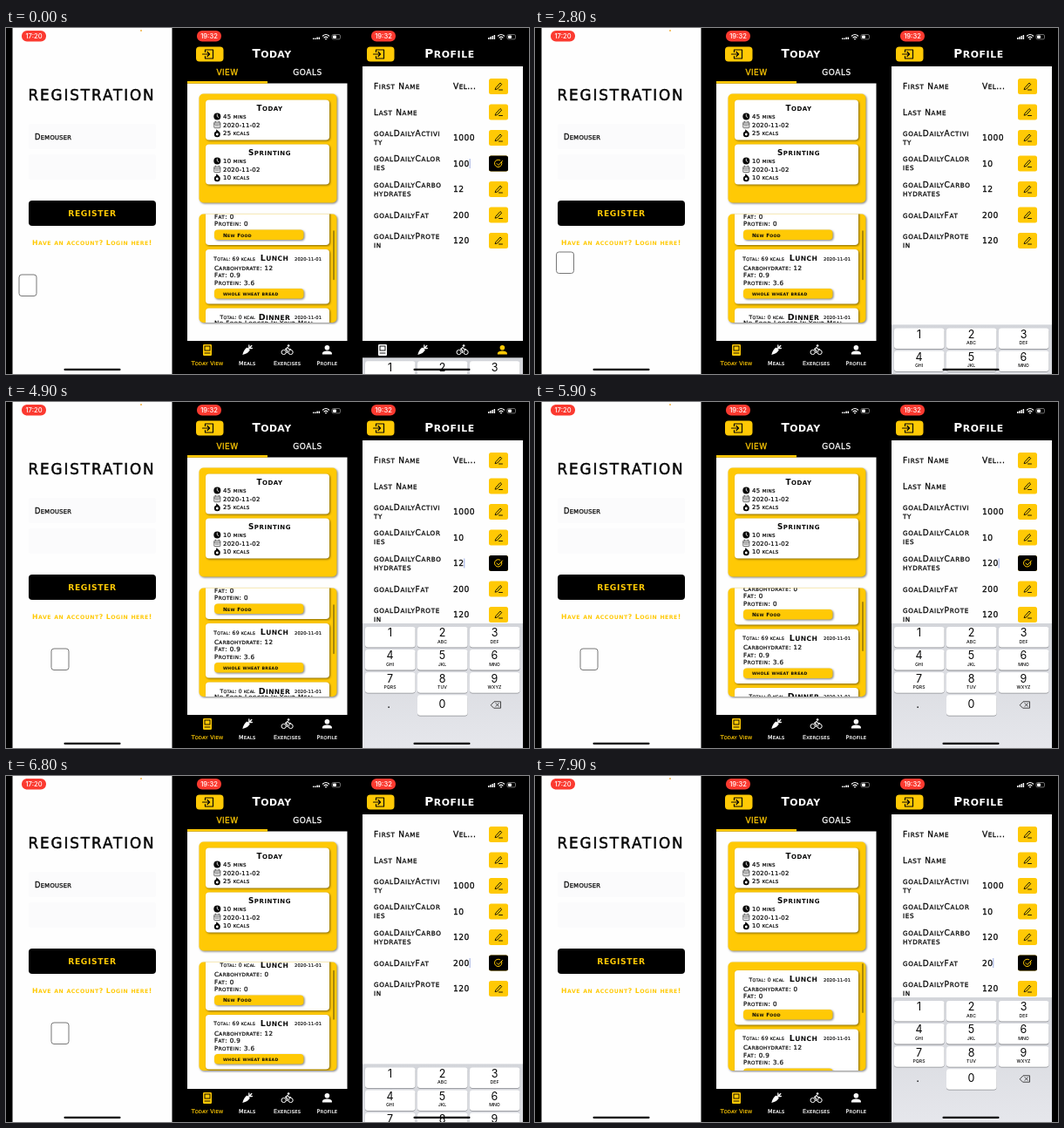
These frames come from a looping animation (600x397 px, 8000 ms). An HTML page:

```html
<!DOCTYPE html>
<html lang="en">
<head>
<meta charset="utf-8">
<title>Fitness app screens</title>
<style>
html, body { margin: 0; width: 100%; height: 100%; overflow: hidden; background: #000; }
svg { display: block; width: 100%; height: 100%; }
.caps { font-family: "DejaVu Sans", sans-serif; }
.ui { font-family: Inter, sans-serif; text-anchor: middle; }
.lift { filter: drop-shadow(1.2px 1.8px 1px rgba(0, 0, 0, .5)); }
.line { fill: none; stroke-linecap: round; stroke-linejoin: round; }
</style>
</head>
<body>
<svg id="stage" viewBox="0 0 600 397" preserveAspectRatio="none"></svg>
<script>
const LOOP = 8000, YELLOW = '#ffc905', INK = '#080808', PAGE = '#fefefe';
const stage = document.getElementById('stage');

const box = (x, y, w, h, fill, r = 0, extra = '') =>
  `<rect x="${x}" y="${y}" width="${w}" height="${h}" rx="${r}" fill="${fill}" ${extra}/>`;

const line = (d, color = INK, width = 1) =>
  `<path class="line" d="${d}" stroke="${color}" stroke-width="${width}"/>`;

const at = (x, y, content) => `<g transform="translate(${x} ${y})">${content}</g>`;

// Lower-case letters become smaller capitals; a thin stroke gives a medium weight.
function caps(x, y, text, size, { bold = false, fill = INK, space = .3, anchor = 'start', id = '' } = {}) {
  const runs = text.replace(/[a-z]+|[^a-z]+/g, run => /[a-z]/.test(run)
    ? `<tspan font-size="${(size * .8).toFixed(2)}">${run.toUpperCase()}</tspan>`
    : `<tspan>${run}</tspan>`);
  return `<text class="caps" ${id && `id="${id}"`} x="${x}" y="${y}" font-size="${size}" fill="${fill}"
    font-weight="${bold ? 700 : 400}" stroke="${fill}" stroke-width="${bold ? 0 : size * .03}"
    letter-spacing="${space}" text-anchor="${anchor}">${runs}</text>`;
}

const ui = (x, y, text, size, fill = INK, weight = 400) =>
  `<text class="ui" x="${x}" y="${y}" font-size="${size}" font-weight="${weight}" fill="${fill}">${text}</text>`;

const clockPill = (x, time) => box(x, 3, 28, 12.5, '#fb3a30', 6) + ui(x + 14, 12, time, 7.6, '#fff', 500);

const homeBar = (x, color) => box(x, 390.8, 65, 2.2, color, 1);

function statusIcons(x, bars) {
  const signal = [0, 1, 2, 3].map(i => {
    const h = bars ? 2 + i : i < 2 ? 1.5 : 2.5;
    return box(x + i * 2.2, 13 - h, 1.5, h, '#fff', .3);
  }).join('');
  return signal
    + line(`M${x + 11.5} 9q3.5-3 7 0M${x + 13} 11q2-1.6 4 0`, '#fff', 1.2)
    + `<circle cx="${x + 15}" cy="12.6" r=".9" fill="#fff"/>`
    + box(x + 22, 7.5, 9.5, 5.4, 'none', 1.5, 'stroke="#999" stroke-width=".7"')
    + box(x + 23, 8.5, 4, 3.4, '#fff', .8);
}

const exitButton = x => at(x, 21.5, box(0, 0, 31.5, 17, YELLOW, 4)
  + line('M10.5 6V3.5h9v10h-9V11M7.5 8.5h8M13 6l2.6 2.5L13 11', INK, 1.2));

const tabIcons = [
  c => box(-5, -6.5, 10, 13, c, 1.2) + box(-3, -4.5, 6, 5, 'none', 0, 'stroke="#000" stroke-width=".9"')
    + line('M-3 3.5h6', '#000', .9),
  c => `<path d="M-5.5 5.5Q-4-1 0-3L3 0Q1 4-5.5 5.5z" fill="${c}"/>` + line('M1.5-1.5L5-5M2-2V-5.5M2-2H5.5', c, 1.3),
  c => `<circle cx="-4" cy="2.5" r="2.6" fill="none" stroke="${c}"/><circle cx="4" cy="2.5" r="2.6" fill="none" stroke="${c}"/>
    <circle cx="1.5" cy="-5" r="1.3" fill="${c}"/>` + line('M0 3V.5L-2-1 .5-3 2-1H4', c, 1.1),
  c => `<circle cy="-2.8" r="2.8" fill="${c}"/><path d="M-5.5 5V3.5Q-5 1 0 1T5.5 3.5V5z" fill="${c}"/>`
];

const tabBar = (x, active) => ['Today View', 'Meals', 'Exercises', 'Profile'].map((label, i) => {
  const color = i === active ? YELLOW : '#fff', cx = x + i * 45.8;
  return at(cx, 369.5, tabIcons[i](color))
    + caps(cx, 386.5, label, 6.4, { fill: color, space: .25, anchor: 'middle' });
}).join('');

const registration = () => box(7.5, 0, 183, 397, PAGE)
  + clockPill(18, '17:20') + '<circle cx="155" cy="3" r="1" fill="#f0b040"/>'
  + caps(25.5, 83, 'REGISTRATION', 16.8, { space: 1.9 })
  + box(26, 110, 146, 29, '#fbfbfc', 2) + box(26, 145, 146, 29, '#fbfbfc', 2)
  + caps(33, 128, 'Demouser', 8.4, { space: .3 })
  + box(26, 198, 146, 29, '#000', 4)
  + caps(99, 215.7, 'REGISTER', 9.2, { bold: true, fill: YELLOW, space: .6, anchor: 'middle' })
  + caps(99, 248.5, 'Have an account? Login here!', 7.8, { bold: true, fill: YELLOW, space: .48, anchor: 'middle' })
  + box(0, 0, 20, 24.5, '#fff', 3, 'id="popup" stroke="#777" stroke-width="1"')
  + homeBar(66.5, '#000');

function activity(y, title, minutes, kcals) {
  const facts = [`${minutes} mins`, '2020-11-02', `${kcals} kcals`];
  const icons = [
    `<circle r="4" fill="${INK}"/>` + line('M0-2.3V0l1.6 1', '#fff', .8),
    box(-3.5, -3, 7, 6.5, 'none', .5, 'stroke="#555" stroke-width=".9"') + line('M-3.5-1h7M-2-4v1M2-4v1M-2 1h4', '#555', .9),
    `<path d="M-1-4.5Q4-1 3.5 1A3.5 3.5 0 0 1-3.5 1Q-3.5-1-2-2Q-1-1-1-4.5z" fill="${INK}"/><circle cy="1.3" r="1.4" fill="#fff"/>`
  ];
  return box(229, y, 142, 46, '#fff', 4, 'class="lift"')
    + caps(302.5, y + 12.2, title, 8.8, { bold: true, space: .5, anchor: 'middle' })
    + facts.map((fact, i) => at(242.3, y + 19 + i * 9.6, icons[i])
      + caps(249, y + 21.7 + i * 9.6, fact, 6.9, { space: .25 })).join('');
}

function meal(index, title, total, facts, food) {
  const y = 223 + index * 67.5, factY = y + (food ? 23.7 : 19);
  return box(229, y, 142, 62.5, '#fff', 4, 'class="lift"')
    + caps(286, y + 12.5, `Total: ${total}`, 6, { anchor: 'end', space: .2 })
    + caps(308, y + 13.2, title, 9.5, { bold: true, anchor: 'middle', space: .35 })
    + caps(331, y + 12.5, '2020-11-01', 5.2, { space: .1 })
    + facts.map((fact, i) => caps(239, factY + i * 8.6, fact, 7.1, { space: .4 })).join('')
    + (food ? box(239, y + 45, 102.5, 11.5, YELLOW, 4, 'class="lift"')
      + caps(249, y + 53, food, 5.8, { bold: true, space: .25 }) : '');
}

const nutrients = (carb, fat, protein) => [`Carbohydrate: ${carb}`, `Fat: ${fat}`, `Protein: ${protein}`];

const today = () => clockPill(219, '19:32') + statusIcons(352, false) + exitButton(218)
  + caps(305, 34, 'Today', 13.6, { bold: true, fill: '#fff', space: .4, anchor: 'middle' })
  + caps(254, 53.8, 'VIEW', 9, { fill: YELLOW, space: .45, anchor: 'middle' })
  + caps(346, 53.8, 'GOALS', 9, { fill: '#fff', space: .5, anchor: 'middle' })
  + box(208, 63.5, 183.5, 295.5, PAGE) + box(208, 61, 92, 2.7, YELLOW)
  + box(221.5, 75.5, 158, 125, YELLOW, 5, 'class="lift"')
  + activity(82.5, 'Today', 45, 25) + activity(133.5, 'Sprinting', 10, 10)
  + box(221.5, 213.5, 158, 124.5, YELLOW, 5, 'class="lift"')
  + `<clipPath id="panel">${box(221.5, 213.5, 158, 124.5, '#000', 5)}</clipPath>
    <g clip-path="url(#panel)"><g id="meals">`
  + meal(0, 'Lunch', '0 kcal', nutrients(0, 0, 0), 'New Food')
  + meal(1, 'Lunch', '69 kcals', nutrients(12, 0.9, 3.6), 'whole wheat bread')
  + meal(2, 'Dinner', '0 kcal', ['No Food Logged In Your Meal'])
  + '</g></g>' + box(375, 215, 2, 57, '#a98708', 1, 'id="thumb"')
  + tabBar(231, 0);

const fields = [
  ['First Name', '', 'Vel...'], ['Last Name', '', ''], ['goalDailyActivi', 'ty', '1000'],
  ['goalDailyCalor', 'ies', ''], ['goalDailyCarbo', 'hydrates', ''],
  ['goalDailyFat', '', ''], ['goalDailyProte', 'in', '120']
];
const rowY = i => 67 + i * 29.5;
const CALORIES = 3, CARBS = 4, FAT = 5;

function field([first, second, value], i) {
  const y = rowY(i), style = { space: .68 };
  const label = second
    ? caps(422, y - 2.2, first, 9, style) + caps(422, y + 7.8, second, 9, style)
    : caps(422, y + 3, first, 9, style);
  return label + caps(513, y + 3.2, value, 9.2, { space: .4, id: 'value' + i })
    + at(554, y - 9, box(0, 0, 22, 18, YELLOW, 2.5)
      + line('M8 10.5L13 5l1.7 1.6L9.7 12 7.5 12.6zM11.5 13h4', INK, .9))
    + `<g id="check${i}" visibility="hidden">` + at(554, y - 9, box(0, 0, 22, 18, '#000', 2.5)
      + line('M14.6 7.3A4.2 4.2 0 1 1 12.8 5.2M9 9l2 2 4.5-5', YELLOW, 1)) + '</g>';
}

function keyboard() {
  const letters = ['', 'ABC', 'DEF', 'GHI', 'JKL', 'MNO', 'PQRS', 'TUV', 'WXYZ'];
  const key = (col, row, digit, id = '') =>
    box(412 + col * 60, 258.8 + row * 26.1, 57.5, 23.5, '#8b8d92', 3)
    + box(412 + col * 60, 258 + row * 26.1, 57.5, 23.5, '#fff', 3, id)
    + ui(440.5 + col * 60, 269.3 + row * 26.1 + (row === 3 ? 3 : 0), digit, 12.5);
  return box(409, 254, 184, 146, 'url(#keys)')
    + letters.map((word, i) => {
      const col = i % 3, row = Math.floor(i / 3);
      return key(col, row, i + 1) + ui(440.5 + col * 60, 277 + row * 26.1, word, 5.2, INK, 500);
    }).join('')
    + key(1, 3, 0, 'id="zero"') + ui(439, 351, '.', 13)
    + line('M556.5 347.5l3.5-3.7h7.5v7.4H560zM562 345.8l3.4 3.4M565.4 345.8l-3.4 3.4', '#333', .9);
}

const profile = () => clockPill(419, '19:32') + statusIcons(553, true) + exitButton(414)
  + caps(509, 34, 'Profile', 13.6, { bold: true, fill: '#fff', space: .6, anchor: 'middle' })
  + box(409, 44, 184, 315, PAGE) + fields.map(field).join('')
  + box(0, 0, .7, 11, '#6f86d6', 0, 'id="caret"')
  + tabBar(432, 3)
  + `<g id="keyboard">${keyboard()}</g>`
  + `<g id="home">${homeBar(467.5, '#000')}</g>`;

stage.innerHTML = `<defs><linearGradient id="keys" x2="0" y2="1">
  <stop stop-color="#d3d5da"/><stop offset="1" stop-color="#e6e7ec"/></linearGradient></defs>`
  + box(0, 0, 600, 397, '#000') + registration() + today() + profile();

const parts = {};
stage.querySelectorAll('[id]').forEach(el => parts[el.id] = el);
const show = (el, on) => el.setAttribute('visibility', on ? 'visible' : 'hidden');
const move = (el, x, y) => el.setAttribute('transform', `translate(${x} ${y})`);
const clamp = v => Math.max(0, Math.min(1, v));
const ease = v => 1 - (1 - clamp(v)) ** 3;

const edits = [
  { row: CALORIES, from: -15, typed: 1600, to: 2708, before: '100', after: '10' },
  { row: CARBS, from: 3500, typed: 5350, to: 6050, before: '12', after: '120' },
  { row: FAT, from: 6735, typed: 7600, to: 9000, before: '200', after: '20' }
];
const popups = [
  { from: 0, to: 1400, x: 15, y: 283 },
  { from: 2300, to: 3300, x: 24.5, y: 257 },
  { from: 4300, to: 7200, x: 52, y: 283 }
];
const during = t => span => t >= span.from && t < span.to;

function render(t) {
  const popup = popups.find(during(t));
  show(parts.popup, popup);
  if (popup) move(parts.popup, popup.x, popup.y);

  const scroll = 36.5 * (1 - clamp((t - 5470) / 2430));
  move(parts.meals, 0, -scroll);
  move(parts.thumb, 0, scroll * .47);

  let raised = 0;
  for (const { row, from, typed, to, before, after } of edits) {
    parts['value' + row].textContent = t < typed ? before : after;
    show(parts['check' + row], t >= from && t < to);
    if (t >= from) raised = t < to ? ease((t - from) / 350) : 1 - ease((t - to) / 350);
  }
  move(parts.keyboard, 0, 143 * (1 - raised));
  show(parts.home, raised > .04);
  parts.zero.setAttribute('fill', t >= 5280 && t < 5400 ? '#c3c6ce' : '#fff');

  const edit = edits.find(during(t));
  const since = edit && (t < edit.typed ? edit.from : edit.typed);
  show(parts.caret, edit && Math.floor((t - since) / 600) % 2 === 0);
  if (edit) {
    const length = (t < edit.typed ? edit.before : edit.after).length;
    move(parts.caret, 513 + length * 6.25, rowY(edit.row) - 5.5);
  }
}

const start = performance.now();
function tick(now) {
  render(Math.max(0, now - start) % LOOP);
  requestAnimationFrame(tick);
}
render(0);
requestAnimationFrame(tick);
</script>
</body>
</html>
```
